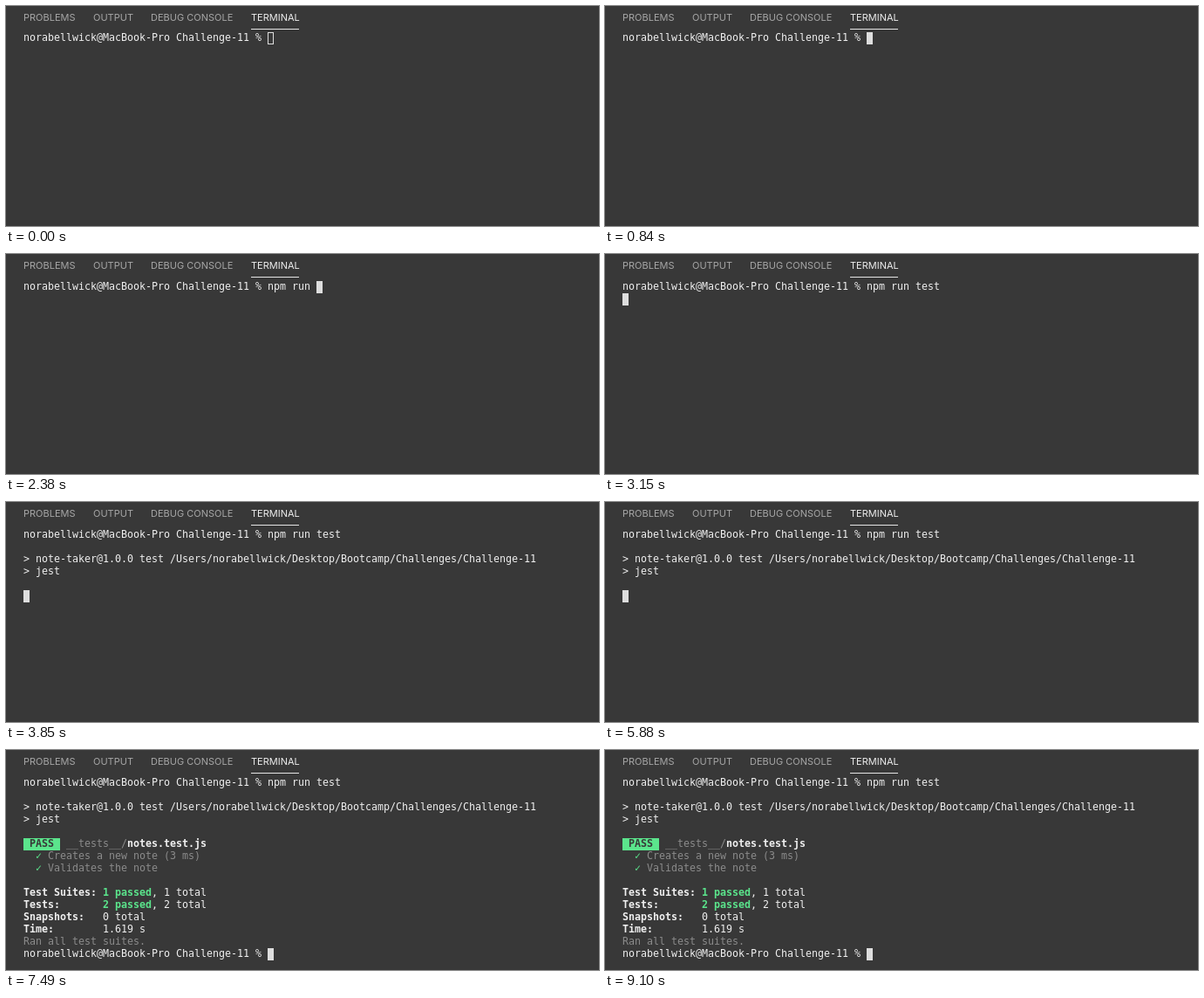
An HTML page with a canvas for the animation above (9.66 s loop, 680 by 252 pixels).

```html
<!DOCTYPE html>
<html lang="en">
<head>
<meta charset="utf-8">
<title>Terminal test run</title>
<style>
  html, body { margin: 0; width: 100%; height: 100%; overflow: hidden; background: #383838; }
  canvas { display: block; }
</style>
</head>
<body>
<canvas width="680" height="252"></canvas>
<script>
const ctx = document.querySelector('canvas').getContext('2d');
const LOOP = 9660, LEFT = 20, CELL = 7, ROW = 14;
const BG = '#383838', FG = '#efefef', DIM = '#8b8b8b', GREEN = '#5be58c', CURSOR = '#dedede';
const MONO = '11.63px "DejaVu Sans Mono", monospace';

const USER = 'norabellwick';
const PROMPT = USER + '@MacBook-Pro Challenge-11 % ';
const COMMAND = 'npm run test';

// [time, characters typed]
const KEYS = [[1610, 1], [1750, 2], [1960, 3], [2030, 4], [2100, 5],
              [2240, 7], [2380, 8], [2590, 10], [2730, 11], [2870, 12]];
const FOCUS = 840, ENTER = 3150, START = 3850, DONE = 7000;

const TABS = [['PROBLEMS', 20], ['OUTPUT', 100], ['DEBUG CONSOLE', 166], ['TERMINAL', 281]];

const plain = s => ({ s, color: FG });
const bold = s => ({ s, color: FG, bold: true });
const dim = s => ({ s, color: DIM });
const green = s => ({ s, color: GREEN });
const pass = s => ({ s, color: GREEN, bold: true });
const badge = s => ({ s, color: BG, bold: true, fill: GREEN });

const STARTED = [
  [2, plain(`> note-taker@1.0.0 test /Users/${USER}/Desktop/Bootcamp/Challenges/Challenge-11`)],
  [3, plain('> jest')]
];
const RESULTS = [
  [5, badge(' PASS '), dim(' __tests__/'), bold('notes.test.js')],
  [6, green('  ✓ '), dim('Creates a new note (3 ms)')],
  [7, green('  ✓ '), dim('Validates the note')],
  [9, bold('Test Suites: '), pass('1 passed'), plain(', 1 total')],
  [10, bold('Tests:       '), pass('2 passed'), plain(', 2 total')],
  [11, bold('Snapshots:   '), plain('0 total')],
  [12, bold('Time:        '), plain('1.619 s')],
  [13, dim('Ran all test suites.')],
  [14, plain(PROMPT)]
];

let top0; // top of the first terminal row

function rect(color, x, y, w, h) {
  ctx.fillStyle = color;
  ctx.fillRect(x, y, w, h);
}

// Each character sits on the terminal's fixed grid.
function drawLine([row, ...spans]) {
  const y = top0 + row * ROW;
  let x = LEFT;
  for (const { s, color, bold, fill } of spans) {
    if (fill) rect(fill, x, y, s.length * CELL, ROW);
    ctx.font = (bold ? 'bold ' : '') + MONO;
    ctx.fillStyle = color;
    for (const ch of s) {
      ctx.fillText(ch, x, y + 10);
      x += CELL;
    }
  }
}

function drawCursor(col, row, solid) {
  const x = LEFT + col * CELL, y = top0 + row * ROW;
  if (solid) return rect(CURSOR, x, y, CELL, ROW);
  ctx.strokeStyle = CURSOR;
  ctx.lineWidth = 1;
  ctx.strokeRect(x + 0.5, y + 0.5, CELL - 1, ROW - 1);
}

function drawTabs() {
  ctx.font = '11px Inter, sans-serif';
  for (const [name, x] of TABS) {
    ctx.fillStyle = name === 'TERMINAL' ? '#ededed' : '#a6a6a6';
    ctx.fillText(name, x, 17);
  }
  rect('#e4e4e4', 281, 26, 55, 1);
}

function draw(t) {
  let typed = 0;
  for (const [at, count] of KEYS) if (t >= at) typed = count;
  top0 = typed ? 31 : 30;

  rect(BG, 0, 0, 680, 252);
  drawTabs();
  drawLine([0, plain(PROMPT + COMMAND.slice(0, typed))]);
  if (t >= START) STARTED.forEach(drawLine);
  if (t >= DONE) RESULTS.forEach(drawLine);

  if (t >= DONE) drawCursor(PROMPT.length, 14, true);
  else if (t >= START) drawCursor(0, 5, true);
  else if (t >= ENTER) drawCursor(0, 1, true);
  else drawCursor(PROMPT.length + typed, 0, t >= FOCUS);
}

const begin = performance.now();
function tick() {
  draw((performance.now() - begin) % LOOP);
  requestAnimationFrame(tick);
}
tick();
</script>
</body>
</html>
```
